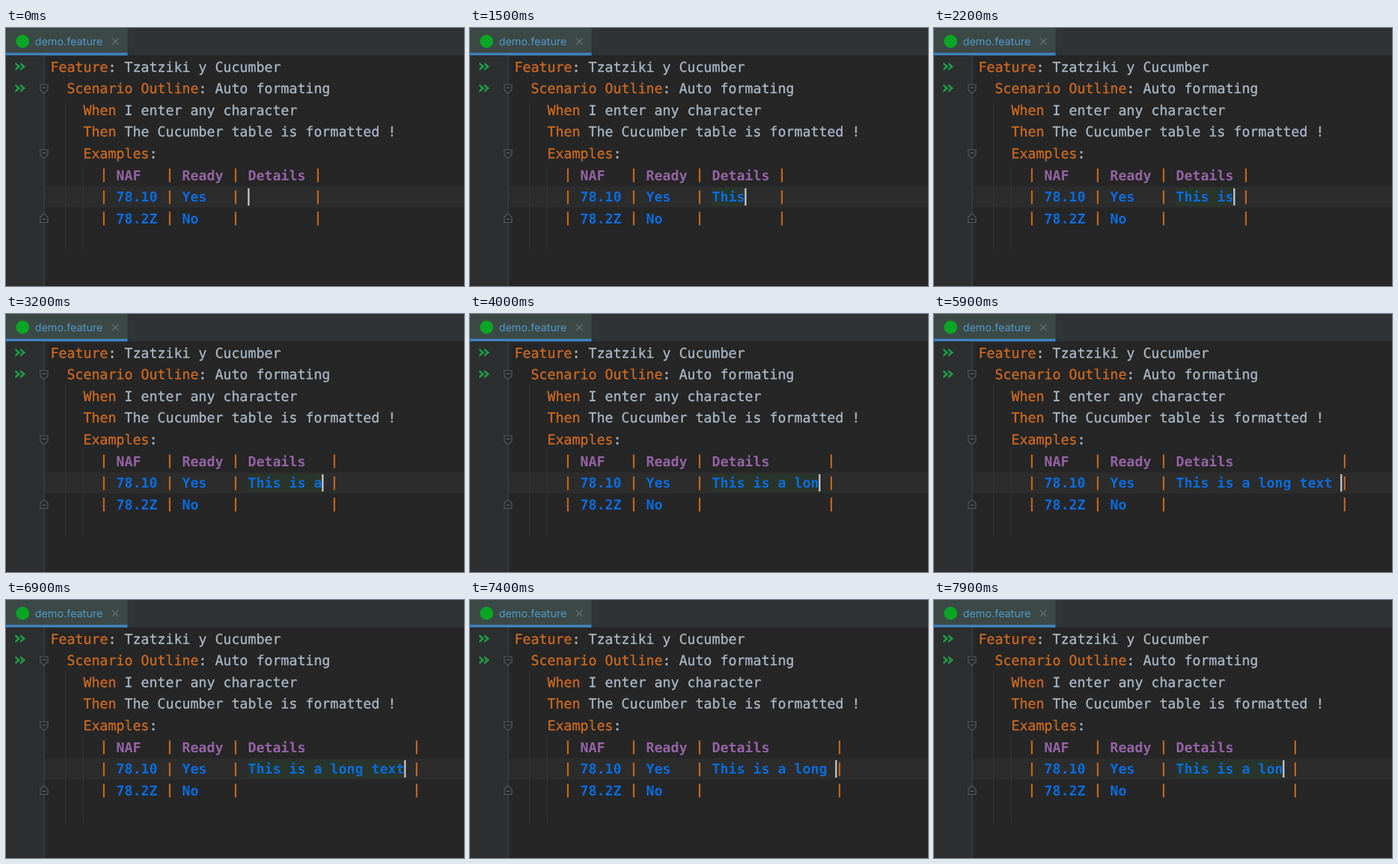
An HTML page with a canvas that plays this animation: 690x388 px, repeating every 8000 ms.

```html
<!DOCTYPE html>
<html lang="en">
<head>
<meta charset="utf-8">
<title>Table auto formatting</title>
<style>
  html, body { margin: 0; width: 100%; height: 100%; overflow: hidden; background: #262626; }
  canvas { display: block; }
</style>
</head>
<body>
<canvas width="690" height="388"></canvas>
<script>
const ctx = document.querySelector('canvas').getContext('2d');
const LOOP = 8000;
const LEFT = 66.9, CELL = 12.4, FIRST_BASE = 65.5, LINE = 32.6;
const CODE_FONT = '20.6px "DejaVu Sans Mono", monospace';
const ORANGE = '#cc6a22', GREY = '#a9b7c6', PURPLE = '#9563a5', BLUE = '#0a6cdc', GREEN = '#1f9d48';

// Moments at which a character is typed or erased in the last cell.
const PHRASE = 'This is a long text ';
const TYPED = [500, 900, 1200, 1500, 1700, 1900, 2100, 2300, 2500, 3300,
               3600, 3800, 4000, 4200, 4500, 4700, 4900, 5100, 5300, 5900];
const ERASED = [6700, 7000, 7100, 7200, 7400, 7500, 7700];
const DETAILS_COL = 24;

const colX = col => LEFT + col * CELL;
const baseY = row => FIRST_BASE + row * LINE;
const countPast = (times, t) => times.filter(time => time <= t).length;

function rect(x, y, w, h, color) {
  ctx.fillStyle = color;
  ctx.fillRect(x, y, w, h);
}

function polyline(points, color, width, close) {
  ctx.beginPath();
  points.forEach(([x, y]) => ctx.lineTo(x, y));
  if (close) ctx.closePath();
  ctx.strokeStyle = color;
  ctx.lineWidth = width;
  ctx.stroke();
}

// Monospaced text on the editor grid.
function code(text, col, row, color, bold = false) {
  ctx.font = (bold ? 'bold ' : '') + CODE_FONT;
  ctx.fillStyle = ctx.strokeStyle = color;
  ctx.lineWidth = 0.35;
  [...text].forEach((char, i) => {
    const x = colX(col + i), y = baseY(row) - (char === '|' ? 1.6 : 0);
    ctx.fillText(char, x, y);
    if (!bold) ctx.strokeText(char, x, y);
  });
}

function step(keyword, rest, col, row) {
  code(keyword, col, row, ORANGE);
  code(rest, col + keyword.length, row, GREY);
}

function tableRow(cells, row, color, lastBar) {
  [6, 14, 22, lastBar].forEach(col => code('|', col, row, ORANGE, true));
  cells.forEach((cell, i) => code(cell, 8 + i * 8, row, color, true));
}

function runIcon(y) {
  ctx.fillStyle = GREEN;
  for (const x of [14, 21.5]) {
    ctx.beginPath();
    ctx.moveTo(x, y - 6.5);
    ctx.lineTo(x + 8, y);
    ctx.lineTo(x, y + 6.5);
    ctx.lineTo(x, y + 3);
    ctx.lineTo(x + 3.2, y);
    ctx.lineTo(x, y - 3);
    ctx.fill();
  }
}

function foldIcon(y, dir) {
  const points = [[51.5, y - 6 * dir], [63, y - 6 * dir], [63, y + 2 * dir],
                  [57.25, y + 7.5 * dir], [51.5, y + 2 * dir]];
  ctx.beginPath();
  points.forEach(([x, py]) => ctx.lineTo(x, py));
  ctx.fillStyle = '#282929';
  ctx.fill();
  polyline(points, '#5c5f61', 1.2, true);
  polyline([[54.5, y - dir], [60, y - dir]], '#6a6d6f', 1.2);
}

function drawTabs() {
  rect(0, 0, 690, 41, '#2f3335');
  rect(0, 0, 183, 38, '#3c4845');
  rect(0, 37.3, 183, 4, '#4083c0');
  ctx.beginPath();
  ctx.arc(25, 20, 10, 0, Math.PI * 2);
  ctx.fillStyle = '#08a524';
  ctx.fill();
  ctx.font = '16.2px Inter, sans-serif';
  ctx.fillStyle = '#5299cb';
  ctx.fillText('demo.feature', 43.5, 26);
  polyline([[160, 15.5], [169.5, 25]], '#6c7476', 1.2);
  polyline([[169.5, 15.5], [160, 25]], '#6c7476', 1.2);
}

function drawGutter() {
  rect(0, 41, 57, 347, '#2c2e30');
  rect(57, 41, 1, 347, '#45484a');
  rect(89, 107, 1, 228, '#363636');
  rect(116, 205, 1, 130, '#363636');
  runIcon(58);
  runIcon(90.5);
  foldIcon(91, 1);
  foldIcon(189, 1);
  foldIcon(286.5, -1);
}

function draw(t) {
  const length = countPast(TYPED, t) - countPast(ERASED, t);
  const typed = PHRASE.slice(0, length);
  const cell = typed.trimEnd();
  const lastBar = DETAILS_COL + Math.max('Details'.length, cell.length) + 1;
  const caretX = colX(DETAILS_COL + length);

  rect(0, 0, 690, 388, '#262626');
  rect(58, 238, 632, 32, '#2c2c2c');
  drawTabs();
  drawGutter();

  step('Feature', ': Tzatziki y Cucumber', 0, 0);
  step('Scenario Outline', ': Auto formating', 2, 1);
  step('When', ' I enter any character', 4, 2);
  step('Then', ' The Cucumber table is formatted !', 4, 3);
  step('Examples', ':', 4, 4);

  // The cell is tinted only while the caret touches its text.
  if (cell && cell === typed) {
    rect(colX(DETAILS_COL), 240, caretX - colX(DETAILS_COL), 28, '#29352b');
  }
  tableRow(['NAF', 'Ready', 'Details'], 5, PURPLE, lastBar);
  tableRow(['78.10', 'Yes', cell], 6, BLUE, lastBar);
  tableRow(['78.2Z', 'No'], 7, BLUE, lastBar);
  rect(caretX - 0.3, 241, 2.6, 26, '#c4c4c4');
}

ctx.textRendering = 'geometricPrecision';
const start = performance.now();
function frame() {
  draw((performance.now() - start) % LOOP);
  requestAnimationFrame(frame);
}
frame();
</script>
</body>
</html>
```
